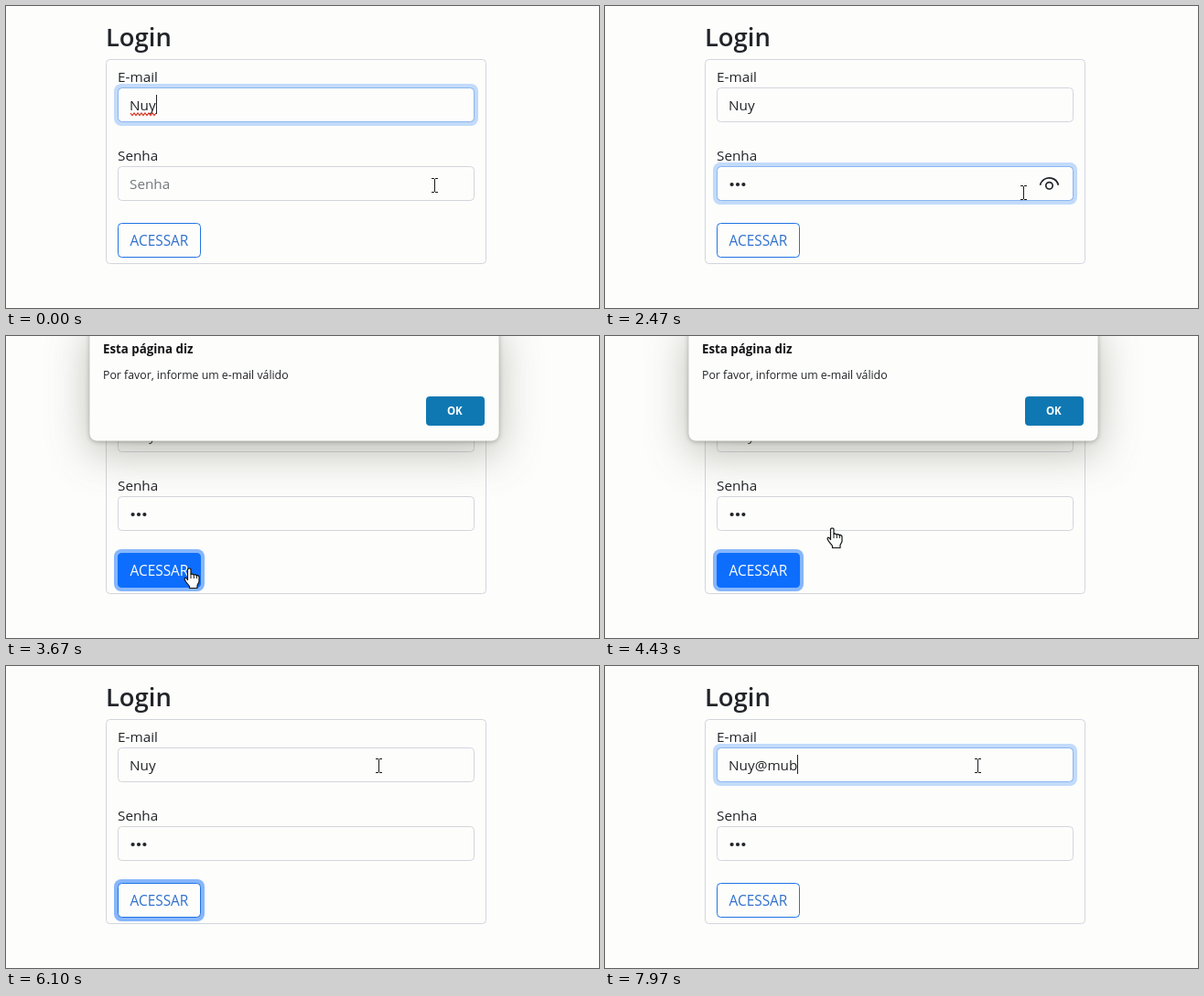
Write an HTML page with a canvas that moves like this. It is 648 by 330 pixels and loops after 8000 ms.

```html
<!DOCTYPE html>
<html lang="pt-BR">
<head>
<meta charset="utf-8">
<title>Login</title>
<style>
html, body { margin: 0; width: 100%; height: 100%; overflow: hidden; background: #fdfdfc; }
canvas { display: block; }
</style>
</head>
<body>
<canvas id="stage" width="648" height="330"></canvas>
<script>
const ctx = document.getElementById('stage').getContext('2d');
const LOOP = 8000;
const FACE = '"Open Sans", "Noto Sans", sans-serif';
const PAPER = '#fdfdfc', INK = '#212428', LINE = '#d3d5dc', BLUE = '#0d6efd';

const EMAIL = { x: 122, y: 89, w: 390, h: 38 };
const PASS = { x: 122, y: 175, w: 390, h: 38 };
const BUTTON = { x: 122, y: 237, w: 91, h: 38 };
const OK = { x: 459, y: 66, w: 64, h: 32 };

// Moments of the session, in ms
const T = { passFocus: 500, press: 2930, release: 3030, alert: 3400, okPress: 5270, close: 5370, emailFocus: 6300 };
const NAME = 'Nuy', SUFFIX = '@mub';
const passKeys = [1100, 1300, 1500];
const emailKeys = [7000, 7450, 7680, 7880];

// Pointer path: time, x, y
const path = [
  [0, 468, 196], [250, 468, 196], [480, 457, 204], [2530, 457, 204],
  [2860, 200, 254], [4230, 200, 254], [4430, 248, 210], [4860, 492, 84],
  [5480, 492, 84], [5800, 407, 109], [LOOP, 407, 109]
];

const clamp = v => Math.max(0, Math.min(1, v));
const smooth = v => v * v * (3 - 2 * v);
const fade = (t, from, to, ms = 150) =>
  smooth(clamp((t - from) / ms)) * (1 - smooth(clamp((t - to) / ms)));
const inside = (p, b) => p.x >= b.x && p.x < b.x + b.w && p.y >= b.y && p.y < b.y + b.h;
const typed = (t, keys) => keys.filter(k => k <= t).length;

function pointerAt(t) {
  const i = Math.max(1, path.findIndex(p => p[0] > t));
  const [a, b] = [path[i - 1], path[i]];
  const k = smooth(clamp((t - a[0]) / (b[0] - a[0])));
  return { x: a[1] + (b[1] - a[1]) * k, y: a[2] + (b[2] - a[2]) * k };
}

function text(str, x, y, size, color = INK, weight = 400, align = 'left') {
  ctx.font = `${weight} ${size}px ${FACE}`;
  ctx.textAlign = align;
  ctx.fillStyle = color;
  ctx.fillText(str, x, y);
  return ctx.measureText(str).width;
}

function box(b, r, fill, stroke) {
  ctx.beginPath();
  ctx.roundRect(b.x + .5, b.y + .5, b.w - 1, b.h - 1, r);
  if (fill) { ctx.fillStyle = fill; ctx.fill(); }
  if (stroke) { ctx.strokeStyle = stroke; ctx.lineWidth = 1; ctx.stroke(); }
}

function withAlpha(a, draw) {
  if (a <= 0) return;
  ctx.save();
  ctx.globalAlpha = a;
  draw();
  ctx.restore();
}

function ring(b, alpha, color) {
  withAlpha(alpha, () => {
    ctx.beginPath();
    ctx.roundRect(b.x - 4, b.y - 4, b.w + 8, b.h + 8, 8);
    ctx.fillStyle = color;
    ctx.fill();
  });
}

function field(b, focus) {
  ring(b, focus, '#c2dbfa');
  box(b, 4, PAPER, LINE);
  withAlpha(focus, () => box(b, 4, null, '#8ab6f0'));
}

function caret(t, since, x, y) {
  if ((t - since) % 1060 >= 530) return;
  ctx.fillStyle = INK;
  ctx.fillRect(Math.round(x), y, 1, 21);
}

function squiggle(x, y, w) {
  ctx.beginPath();
  for (let i = 0; i <= w; i += 2) ctx.lineTo(x + i, y + (i % 4 ? 1.5 : -1));
  ctx.strokeStyle = '#d8321e';
  ctx.lineWidth = 1.2;
  ctx.stroke();
}

function eye() {
  ctx.strokeStyle = INK;
  ctx.lineWidth = 1.7;
  ctx.beginPath();
  ctx.arc(485.5, 198, 10.2, Math.PI * 1.07, Math.PI * 1.93);
  ctx.stroke();
  ctx.beginPath();
  ctx.arc(485.5, 196.3, 3.7, 0, Math.PI * 2);
  ctx.stroke();
}

function drawEmail(t) {
  const early = t < T.passFocus, late = t >= T.emailFocus;
  field(EMAIL, fade(t, -999, T.passFocus) + fade(t, T.emailFocus, LOOP + 999));
  const n = typed(t, emailKeys);
  const w = text(NAME + SUFFIX.slice(0, n), 135, 114, 15.3);
  if (early) squiggle(136, 118, w);
  if (early) caret(t, 0, 135 + w, 97);
  if (late) caret(t, n ? emailKeys[n - 1] : T.emailFocus, 135 + w, 97);
}

function drawPass(t) {
  const active = t >= T.passFocus && t < T.press;
  field(PASS, fade(t, T.passFocus, T.press));
  const n = typed(t, passKeys);
  if (!n) text('Senha', 135, 200, 15.3, '#73787c');
  ctx.fillStyle = INK;
  for (let i = 0; i < n; i++) {
    ctx.beginPath();
    ctx.arc(138.6 + i * 6.4, 195, 2.1, 0, Math.PI * 2);
    ctx.fill();
  }
  if (active) caret(t, n ? passKeys[n - 1] : T.passFocus, 136 + n * 6.4, 183);
  if (active && n) eye();
}

function drawButton(t) {
  const hover = fade(t, 2780, T.close + 50);
  ring(BUTTON, fade(t, T.press, T.emailFocus), '#86b6fc');
  box(BUTTON, 4, PAPER, '#2074e4');
  text('ACESSAR', 135.5, 262, 15.4, '#2f70cc');
  withAlpha(hover, () => {
    box(BUTTON, 4, t >= T.press && t < T.release ? '#0b64e6' : BLUE, BLUE);
    text('ACESSAR', 135.5, 262, 15.4, '#fcfefc');
  });
}

function drawAlert(t, pointer) {
  if (t < T.alert || t >= T.close) return;
  withAlpha(fade(t, T.alert, LOOP, 100), () => {
    const panel = { x: 91, y: -20, w: 448, h: 135 };
    ctx.save();
    ctx.shadowColor = 'rgba(100,100,84,.42)';
    ctx.shadowBlur = 46;
    ctx.shadowOffsetY = 13;
    box(panel, 8, PAPER);
    ctx.shadowColor = 'rgba(70,70,64,.4)';
    ctx.shadowBlur = 5;
    ctx.shadowOffsetY = 1;
    box(panel, 8, PAPER);
    ctx.restore();
    text('Esta página diz', 106, 19, 13.3, '#141416', 700);
    text('Por favor, informe um e-mail válido', 106, 47, 12.3, INK);
    const color = t >= T.okPress ? '#07588f' : inside(pointer, OK) ? '#0a68a6' : '#0f78b2';
    box(OK, 3, color, color);
    text('OK', 490.3, 86, 11.5, '#fcfefc', 700, 'center');
  });
}

function outline(points, x, y) {
  ctx.beginPath();
  points.forEach(([px, py]) => ctx.lineTo(x + px, y + py));
  ctx.closePath();
  ctx.lineJoin = 'round';
  ctx.lineWidth = 1.2;
  ctx.fillStyle = '#fcfefc';
  ctx.strokeStyle = '#141414';
  ctx.fill();
  ctx.stroke();
}

const ARROW = [[0, 0], [0, 16], [3.8, 12.4], [6.6, 19], [9.4, 17.8], [6.6, 11.4], [11.6, 11.4]];
const HAND = [
  [-1.5, 1], [-.5, 0], [1, 0], [2, 1], [2, 6.5], [3.5, 5.9], [5.3, 7], [6.6, 6.5], [8.3, 7.7],
  [9.6, 7.4], [11, 9], [11, 14.5], [9, 18.5], [9, 21.5], [.5, 21.5], [.5, 19.5],
  [-3.5, 14.5], [-5, 11.5], [-4.3, 10.2], [-3, 10.5], [-1.5, 12.5]
];

function hand(x, y) {
  outline(HAND, x, y);
  ctx.beginPath();
  for (const dx of [2, 5.3, 8.3]) {
    ctx.moveTo(x + dx, y + 6.8);
    ctx.lineTo(x + dx, y + 11);
  }
  ctx.lineWidth = 1;
  ctx.stroke();
}

function beam(x, y) {
  x = Math.round(x);
  y = Math.round(y);
  ctx.fillStyle = '#1c1c1c';
  ctx.fillRect(x, y - 7, 1, 14);
  for (const dy of [-8, 7]) {
    ctx.fillRect(x - 3, y + dy, 3, 1);
    ctx.fillRect(x + 1, y + dy, 3, 1);
  }
}

function drawPointer(t, p) {
  const modal = t >= T.alert && t < T.close;
  if (modal ? p.y > 115 : inside(p, BUTTON)) hand(p.x, p.y);
  else if (!modal && (inside(p, EMAIL) || inside(p, PASS))) beam(p.x, p.y);
  else outline(ARROW, p.x, p.y);
}

function render(t) {
  const pointer = pointerAt(t);
  ctx.fillStyle = PAPER;
  ctx.fillRect(0, 0, 648, 330);
  text('Login', 109, 44, 27.4, INK, 600);
  box({ x: 109, y: 58, w: 416, h: 224 }, 4, null, LINE);
  text('E-mail', 122, 83, 15.3);
  text('Senha', 122, 169, 15.3);
  drawEmail(t);
  drawPass(t);
  drawButton(t);
  drawAlert(t, pointer);
  drawPointer(t, pointer);
}

const start = performance.now();
function tick() {
  render((performance.now() - start) % LOOP);
  requestAnimationFrame(tick);
}
tick();
</script>
</body>
</html>
```
